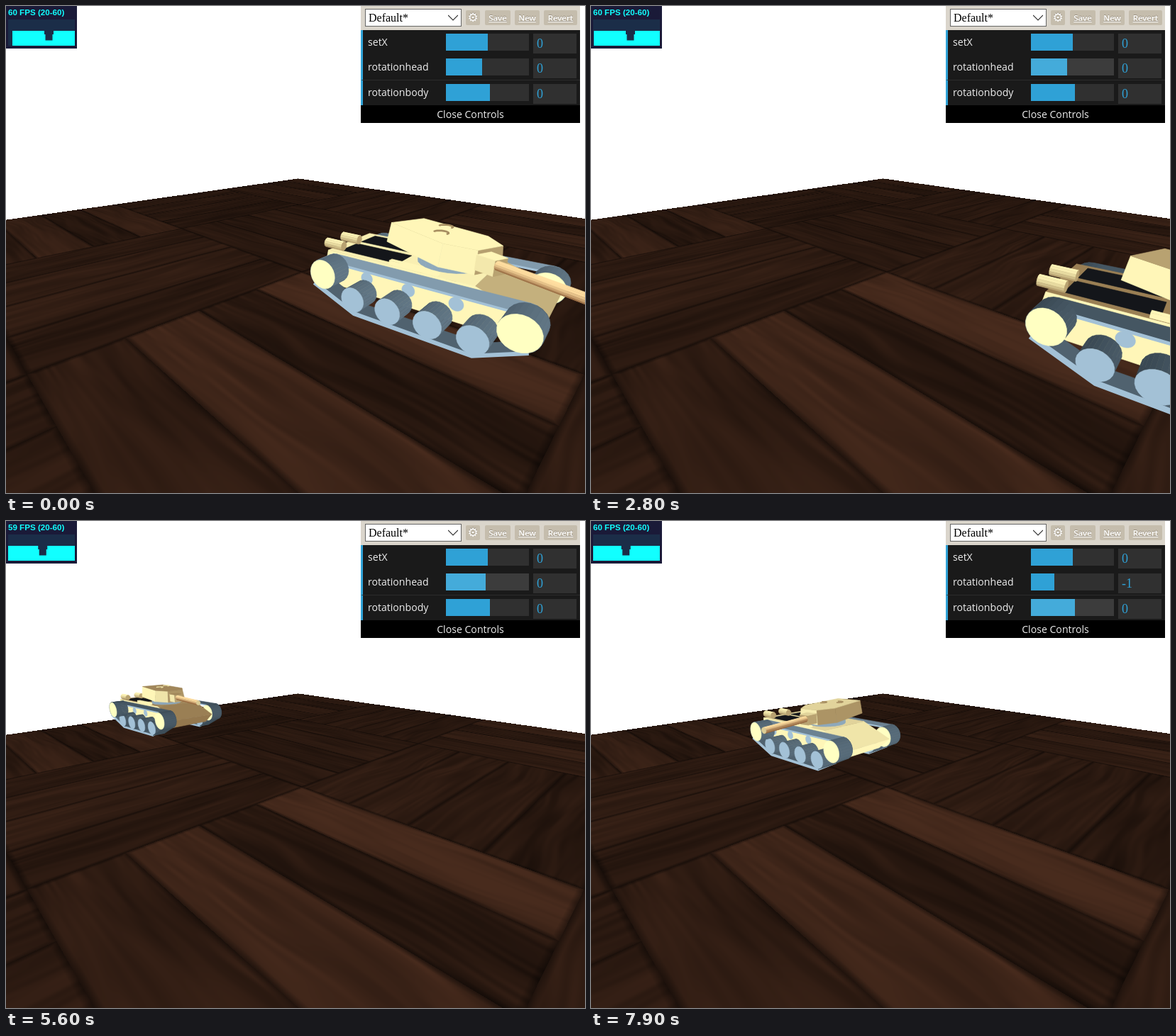
Recreate the animation shown at these times as an HTML page with a canvas. Size 816 by 687 pixels, loop 8000 ms.

```html
<!DOCTYPE html>
<html lang="en">
<head>
<meta charset="utf-8">
<title>Tank controls</title>
<style>
  html, body { margin: 0; width: 816px; height: 687px; overflow: hidden; background: #fff; }
  canvas, #fps, #gui, #gui * { position: absolute; box-sizing: border-box; }
  canvas { left: 0; top: 0; }
  #fps { left: 3px; top: 2px; font: bold 11.6px/14px "Liberation Sans", sans-serif; color: #1ff; white-space: nowrap; }
  #gui { left: 500px; top: 0; width: 309px; height: 165px; background: #000; color: #eee;
         font: 14.1px "Open Sans", "Noto Sans", sans-serif; white-space: nowrap; }
  #bar { width: 309px; height: 34px; background: #dad5cb; }
  #preset { left: 6px; top: 4px; width: 136px; height: 25px; padding-left: 4px; background: #fff;
            border: 1px solid #666; color: #000; font: 16px/24px "Liberation Serif", serif; }
  #preset svg { right: 4px; top: 6px; }
  .btn { top: 6px; height: 21px; background: #c5bdad; border-radius: 2px; color: #fff; text-align: center;
         font: 600 11.4px/21px "Open Sans", sans-serif; text-decoration: underline; text-shadow: 0 -1px 0 #999080; }
  .gear { font: bold 17px/20px "DejaVu Sans", sans-serif; text-decoration: none; }
  .row { left: 0; width: 309px; height: 36px; background: #1a1a1a; border-left: 3px solid #2fa1d6;
         border-bottom: 1px solid #2c2c2c; }
  .row span { left: 7px; line-height: 34px; }
  .slider { left: 117px; top: 5px; width: 117px; height: 24px; background: #303030; }
  .slider i { left: 0; top: 0; height: 24px; background: #2fa1d6; }
  .hover .slider { background: #3c3c3c; }
  .hover i { background: #44abda; }
  .row b { left: 240px; top: 5px; width: 61px; height: 28px; padding-left: 5px; background: #303030;
           color: #2fa1d6; font: 18px/28px "Liberation Serif", serif; }
  #close { top: 140px; width: 309px; height: 25px; line-height: 25px; text-align: center; background: #000; }
</style>
</head>
<body>
<canvas id="stage" width="816" height="687"></canvas>
<div id="fps"></div>
<div id="gui">
  <div id="bar">
    <div id="preset">Default*<svg width="14" height="12"><path d="M0 2l7 7 7-7" fill="none" stroke="#333" stroke-width="1.2"/></svg></div>
    <div class="btn gear" style="left:148px;width:20px">⚙</div>
    <div class="btn" style="left:175px;width:36px">Save</div>
    <div class="btn" style="left:217px;width:35px">New</div>
    <div class="btn" style="left:258px;width:47px">Revert</div>
  </div>
</div>
<script>
const W = 816, H = 687, LOOP = 8000, TAU = 2 * Math.PI;
const stage = document.getElementById('stage'), ctx = stage.getContext('2d');
const fps = document.getElementById('fps'), gui = document.getElementById('gui');

const rows = ['setX', 'rotationhead', 'rotationbody'].map((name, i) => {
  const row = document.createElement('div');
  row.className = 'row';
  row.style.top = Math.round(34 + 35.4 * i) + 'px';
  row.innerHTML = `<span>${name}</span><div class="slider"><i></i></div><b>0</b>`;
  gui.append(row);
  return { row, fill: row.querySelector('i'), value: row.querySelector('b') };
});
rows[0].fill.style.width = '59px';
rows[2].fill.style.width = '62px';
gui.insertAdjacentHTML('beforeend', '<div id="close">Close Controls</div>');

// Camera above the floor; one unit is one parquet block.
const F = 552, CX = 408, CY = 343.5, COS = .9494, SIN = .3139, CAM_H = .613, CAM_Z = 1.552;

function project(a, b, y) {
  const x = (a - b) * Math.SQRT1_2, z = CAM_Z + (a + b) * Math.SQRT1_2, d = CAM_H - y;
  const depth = z * COS + d * SIN;
  return [CX + F * x / depth, CY + F * (d * COS - z * SIN) / depth, F / depth];
}

// ---- Floor ----
const hash = (x, y) => { const s = Math.sin(x * 127.1 + y * 311.7) * 43758.5453; return s - Math.floor(s); };
function noise(x, y) {
  const i = Math.floor(x), j = Math.floor(y), smooth = t => t * t * (3 - 2 * t);
  const u = smooth(x - i), v = smooth(y - j);
  const top = hash(i, j) * (1 - u) + hash(i + 1, j) * u;
  return top * (1 - v) + (hash(i, j + 1) * (1 - u) + hash(i + 1, j + 1) * u) * v;
}
// Board tones by block parity
const TONES = [[[.3, .2, .4, .3], [.1, .25, .4, .35]], [[.2, .4, .45, .3], [.4, .8, .15, .95]]];

function wood(a, b, depth) {
  const i = Math.floor(a), j = Math.floor(b), even = !((i + j) & 1);
  const across = even ? a : b, along = even ? b : a;
  const pos = (across - Math.floor(across)) * 4, k = Math.floor(pos), id = i * 7 + j * 13 + k * 29;
  const rough = 1 / (1 + depth * .25);
  const warp = noise(along * 4 + id, across * 9) * .05;
  const grain = noise(along * 5 + id, (across + warp) * 75) - .5;
  const streak = noise(along * 3 - id, (across + warp) * 26) - .5;
  let tone = TONES[i & 1][j & 1][k] / Math.max(1, depth - .7) + (grain * .4 + streak * .55) * rough;
  const seam = Math.min(pos - k, k + 1 - pos) / 4;
  const end = Math.min(along - Math.floor(along), Math.ceil(along) - along);
  const shade = Math.min(1, .6 + Math.min(seam, end) * 28);
  tone = Math.max(-.25, Math.min(1.15, tone));
  return [34 + 33 * tone, 20 + 20 * tone, 13 + 14 * tone].map(c => c * shade);
}

const floor = document.createElement('canvas');
floor.width = W;
floor.height = H;
{
  const g = floor.getContext('2d'), img = g.createImageData(W, H);
  for (let v = 240; v < H; v++) for (let u = 0; u < W; u++) {
    const dx = (u - CX) / F, dy = (v - CY) / F, depth = CAM_H / (SIN + COS * dy);
    const x = dx * depth - .025, z = depth * (COS - SIN * dy) - CAM_Z;
    const a = (z + x) * Math.SQRT1_2, b = (z - x) * Math.SQRT1_2;
    if (a < 2 && b < 2) img.data.set([...wood(a, b, depth), 255], (v * W + u) * 4);
  }
  g.putImageData(img, 0, 0);
}

// ---- Solids ----
const mix = (p, q, k) => `rgb(${p.map((c, i) => Math.round(c + (q[i] - c) * Math.max(0, Math.min(1, k))))})`;
const paint = k => mix([136, 106, 66], [255, 246, 184], k);
const steel = k => mix([58, 73, 84], [168, 199, 221], k);

const area = pts => pts.reduce((sum, p, i) => {
  const q = pts[(i + 1) % pts.length];
  return sum + p[0] * q[1] - q[0] * p[1];
}, 0);
function trace(pts) {
  ctx.beginPath();
  pts.forEach(p => ctx.lineTo(p[0], p[1]));
}
function fill(pts, color) {
  trace(pts);
  ctx.closePath();
  ctx.fillStyle = ctx.strokeStyle = color;
  ctx.lineWidth = .6;
  ctx.fill();
  ctx.stroke();
}
function line(pts, color, width) {
  trace(pts);
  ctx.strokeStyle = color;
  ctx.lineWidth = width;
  ctx.stroke();
}
const sides = (lo, hi) => lo.map((p, i) => {
  const n = (i + 1) % lo.length;
  return [p, lo[n], hi[n], hi[i]];
});
// Convex body between two rings, counter-clockwise seen from the cap
function prism(lo, hi, cap, side) {
  sides(lo, hi).forEach((quad, i) => { if (area(quad) < 0) fill(quad, side(i)); });
  if (area(hi) < 0) fill(hi, cap);
}
const arc = (x, y, r, from, to, n) => Array.from({ length: n + 1 }, (_, i) => {
  const t = from + (to - from) * i / n;
  return [x + r * Math.cos(t), y + r * Math.sin(t)];
});
const circle = (x, y, r, n = 24) => arc(x, y, r, 0, TAU * (1 - 1 / n), n - 1);

// ---- Tank: l forward, w sideways, y up ----
const YAW = .075, DRIFT = .043, LANE = .135;
const HULL = [[-.28, .04], [.28, .04], [.35, .1], [.17, .168], [-.34, .165], [-.35, .11]];
const TURRET = [[-.21, -.075], [.06, -.095], [.15, -.05], [.15, .05], [.06, .095], [-.21, .075]];
const BELT = [[-.17, -.003], [.21, -.003],
  ...arc(.31, .105, .053, -1, TAU / 4, 9), ...arc(-.305, .103, .053, TAU / 4, 4, 9)];
const ROAD_WHEELS = [-.18, -.052, .077, .205], ROLLERS = [-.13, .01, .15];

function drawTank({ pos, head, top, deck, front, belt }) {
  const yc = Math.cos(YAW), ys = Math.sin(YAW);
  const at = (l, w, y) => project(LANE + DRIFT * pos + l * ys + w * yc, pos - l * yc + w * ys, y);
  const cos = Math.cos(head), sin = Math.sin(head);
  const onHead = (p, q, y) => at(.04 + p * cos - q * sin, p * sin + q * cos, y);

  function wheel(l, y, r, w0, w1, cap) {
    const ring = circle(l, y, r);
    prism(ring.map(p => at(p[0], w1, p[1])), ring.map(p => at(p[0], w0, p[1])), cap,
      i => steel(belt * .4 + .1 * Math.cos(i / 24 * TAU)));
  }
  function trackUnit(w0, w1) {
    const near = BELT.map(p => at(p[0], w0, p[1]));
    const quads = sides(BELT.map(p => at(p[0], w1, p[1])), near);
    const unit = at(0, w0, .05)[2], light = steel(.95);
    quads.forEach(q => { if (area(q) >= 0) fill(q, steel(.2)); });
    ROLLERS.forEach(l => fill(circle(l, .135, .02).map(p => at(p[0], w0, p[1])), light));
    line([near.at(-1), ...near.slice(0, 3)], light, .013 * unit);
    ROAD_WHEELS.forEach(l => wheel(l, .044, .043, w0, w1, light));
    quads.forEach((q, i) => { if (area(q) < 0) fill(q, steel(belt * (i > 9 ? 1 : .3))); });
    line([near[11], near[12]], light, .008 * unit);
    wheel(-.305, .103, .052, w0, w1, '#ffffc2');
    wheel(.31, .105, .052, w0, w1, '#ffffc2');
  }

  trackUnit(.14, .22);

  const hullSides = [0, front, (front + deck) / 2, deck, deck, 0];
  prism(HULL.map(p => at(p[0], .145, p[1])), HULL.map(p => at(p[0], -.145, p[1])), paint(1), i => paint(hullSides[i]));
  for (const w of [-.12, .015])
    fill([at(-.3, w, .167), at(-.08, w, .168), at(-.08, w + .105, .168), at(-.3, w + .105, .167)], '#14161a');
  for (const w of [0, -.105]) {
    const ring = circle(w, .178, .017, 12);
    prism(ring.map(p => at(-.375, ...p)), ring.map(p => at(-.3, ...p)), paint(.4),
      i => paint(.6 + .4 * Math.sin(i / 12 * TAU)));
  }
  const rail = [[-.1, -.14], [.06, -.14], [.06, -.122], [-.1, -.122]];
  prism(rail.map(p => at(...p, .167)), rail.map(p => at(...p, .18)), paint(1), () => paint(1));

  trackUnit(-.225, -.14);

  const ring = circle(0, 0, .095);
  prism(ring.map(p => onHead(...p, .166)), ring.map(p => onHead(...p, .19)), steel(.6), () => steel(.75));

  // Faces turned to the near side are lit
  const facing = (dp, dq) => {
    const len = Math.hypot(dp, dq), np = dq / len, nq = -dp / len;
    const nl = np * cos - nq * sin, nw = np * sin + nq * cos;
    return Math.max(.3, .4 - .6 * nw - .3 * nl);
  };
  const turretSide = i => {
    const p = TURRET[i], q = TURRET[(i + 1) % 6];
    return paint(facing(q[0] - p[0], q[1] - p[1]));
  };
  prism(TURRET.map(p => onHead(p[0] * 1.03, p[1] * 1.12, .19)), TURRET.map(p => onHead(...p, .262)), paint(top), turretSide);
  for (const [p, q] of [[-.06, .035], [-.01, -.035]])
    line(arc(p, q, .022, 0, 4, 12).map(c => onHead(...c, .272)), paint(top > .6 ? .25 : .9), .006 * onHead(p, q, .27)[2]);

  const mantlet = [[.13, -.03], [.19, -.025], [.19, .025], [.13, .03]];
  prism(mantlet.map(p => onHead(...p, .192)), mantlet.map(p => onHead(...p, .24)), paint(top), i => paint([.9, .4, .4, .4][i]));
  const bore = circle(0, .218, .0135, 14);
  prism(bore.map(p => onHead(.18, ...p)), bore.map(p => onHead(.46, ...p)), paint(.7),
    i => mix([146, 100, 62], [255, 222, 160], .5 + .6 * Math.sin(i / 14 * TAU)));
}

// ---- Timeline ----
const KEYS = ['pos', 'head', 'top', 'deck', 'front', 'belt'];
const POSES = [
  [0, -.556, -.43, 1, .95, .05, .65],
  [600, -1.05, -.43, .4, .15, .1, .1],
  [4600, -1.05, -.43, .4, .15, .1, .1],
  [4700, -.91, -.43, .15, .25, .1, .1],
  [5500, 1.4, -.13, .2, .2, .1, .1],
  [5600, 1.52, -.13, .2, .2, .1, .1],
  [6100, 1.52, -.13, .2, .2, .1, .1],
  [7100, 1.25, .59, .35, .85, .95, .12],
  [7900, .605, -1.37, .75, .75, 1, .45],
  [LOOP, .605, -1.37, .75, .75, 1, .45]
];
function poseAt(t) {
  const i = POSES.findIndex(p => p[0] > t), from = POSES[i - 1], to = POSES[i];
  const k = (t - from[0]) / (to[0] - from[0]);
  return Object.fromEntries(KEYS.map((key, n) => [key, from[n + 1] + (to[n + 1] - from[n + 1]) * k]));
}
const within = (t, from, to) => t >= from && t < to;

function drawStats(t) {
  const shift = 1.25 * Math.floor((t + 800) / 900), left = Math.max(3, 9 - shift), dip = 54 - shift;
  const box = (color, ...r) => { ctx.fillStyle = color; ctx.fillRect(...r); };
  box('#1a1a38', 0, 0, 100, 60);
  box('#1b2d48', 3, 19, 94, 37);
  box('#1ff', left, 35, 97 - left, 21);
  box('#1b2d48', dip, 34, 13, 6);
  box('#1b2d48', dip + 1.5, 40, 10, 8.5);
  const slow = within(t, 1000, 1100) || within(t, 3700, 3800) || within(t, 5600, 6400);
  fps.textContent = (slow ? 59 : 60) + ' FPS (20-60)';
}

function draw(now) {
  const t = Math.floor(now % LOOP / 100) * 100, pose = poseAt(t);
  ctx.clearRect(0, 0, W, H);
  ctx.drawImage(floor, 0, 0);
  drawTank(pose);
  drawStats(t);
  rows[1].fill.style.width = 58.5 + 18.6 * pose.head + 'px';
  rows[1].value.textContent = Math.round(pose.head);
  const hover = [within(t, 1000, 2300), within(t, 2300, 7000), t >= 7700];
  rows.forEach(({ row }, i) => row.classList.toggle('hover', hover[i]));
}

const start = performance.now();
function tick() {
  draw(performance.now() - start);
  requestAnimationFrame(tick);
}
tick();
</script>
</body>
</html>
```
